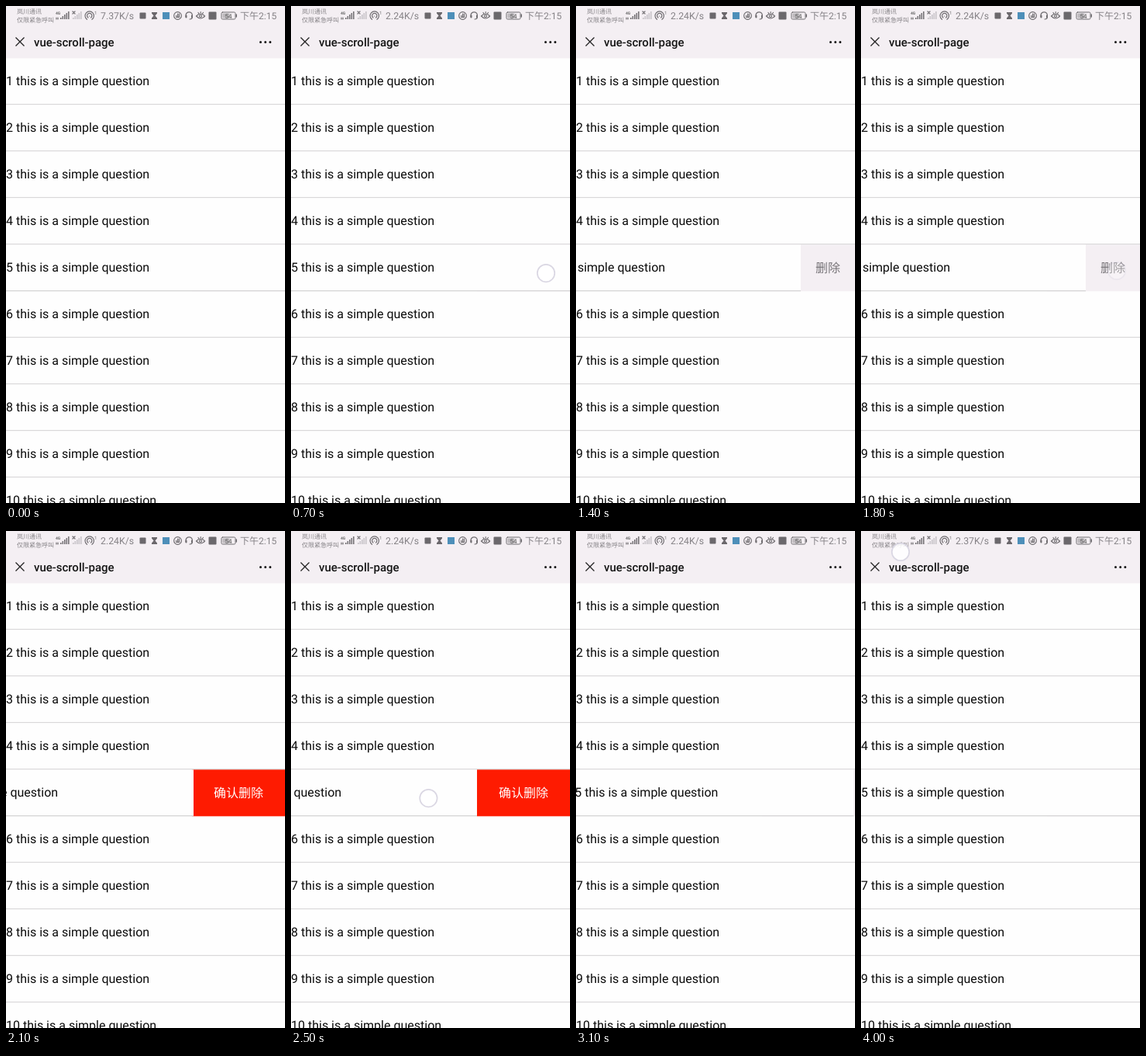
Recreate the animation shown at these times as an HTML page. Size 360 by 640 pixels, loop 4100 ms.

```html
<!DOCTYPE html>
<html lang="zh-CN">
<head>
<meta charset="utf-8">
<title>vue-scroll-page</title>
<style>
  html, body { margin: 0; width: 100%; height: 100%; overflow: hidden; background: #fefefe; }
  svg { display: block; width: 360px; height: 640px; }
  text {
    font-family: Roboto, "Noto Sans CJK SC", "Noto Sans CJK", sans-serif;
    white-space: pre; text-rendering: geometricPrecision;
  }
  .row { font-size: 16px; fill: #0c0c0c; }
  .action { font-size: 16px; text-anchor: middle; }
  .status { font-size: 12px; fill: #858286; }
  .tiny { font-size: 8px; fill: #858286; }
  .icon { fill: #6b686c; }
  .line { fill: none; stroke: #6f6c70; stroke-width: 1.2; stroke-linecap: round; }
</style>
</head>
<body>
<svg viewBox="0 0 360 640">
  <rect width="360" height="640" fill="#fefefe"/>
  <g transform="translate(0 .33)">
    <g id="list"></g>
    <rect id="panel" x="240" y="307" width="120" height="60"/>
    <text id="label" class="action" y="343"></text>
    <g id="swiped"></g>
  </g>

  <rect width="360" height="67.33" fill="#f4eff3"/>
  <text class="tiny" x="14" y="10">岚川通讯</text>
  <text class="tiny" x="14" y="21">仅限紧急呼叫</text>
  <g id="bars" fill="#777478"></g>
  <text x="64" y="11" font-size="5" font-weight="700" fill="#666">4G</text>
  <path class="line" d="M65 15v2m2-2v2M86 7l3 3m0-3l-3 3"/>
  <path class="line" d="M104.5 17.3a5.7 5.7 0 1 1 6.5 0M106 15a3.1 3.1 0 1 1 3.5 0M107.7 13v.1"/>
  <text x="114" y="11" font-size="6" fill="#777">1</text>
  <text id="speed" class="status" x="122" y="17" style="font-size: 12.3px"></text>
  <rect class="icon" x="172.5" y="8.5" width="8" height="8" rx="1"/>
  <path class="icon" d="M188 8h7v1.5l-2.5 3 2.5 3V17h-7v-1.5l2.5-3-2.5-3z"/>
  <rect x="202" y="8" width="9" height="9" fill="#4d8fb9"/>
  <g class="line">
    <circle cx="221.5" cy="12.5" r="4.8"/>
    <path d="M219.8 12v2.5h3.6V10m-1.8 0v4"/>
    <path d="M232 14v-2a4.2 4.2 0 0 1 8.4 0v2q0 3-3.4 3"/>
    <path d="M232.5 12.5v2m7.5-2v2" stroke-width="2"/>
    <path d="M245.5 13q5.5-6 11 0q-5.5 6-11 0zM248 8.5l.7 1m2.5-1.8v1m3.2-.2l-.7 1"/>
    <circle cx="251" cy="13" r="1.5"/>
    <rect x="278" y="8" width="18" height="9" rx="1.5" stroke-width="1"/>
  </g>
  <rect class="icon" x="261.5" y="7.5" width="10" height="10" rx="1"/>
  <rect x="279.5" y="9.5" width="9" height="6" fill="#bbb7bb"/>
  <rect class="icon" x="296.5" y="10.5" width="1.5" height="4"/>
  <text x="287" y="15.5" font-size="8" text-anchor="middle" fill="#555">54</text>
  <text class="status" x="302" y="17">下午2:15</text>

  <path d="M12.5 40.5l11 11m0-11l-11 11" stroke="#222" stroke-width="1.3"/>
  <text x="36" y="52" font-size="15" font-weight="500" fill="#161616">vue-scroll-page</text>
  <path d="M328.5 46.5h13" fill="none" stroke="#111" stroke-width="3"
    stroke-linecap="round" stroke-dasharray="0 6.2"/>
  <circle id="touch" r="11.2" fill="#fff" fill-opacity=".85" stroke="#dad7e3" stroke-width="1.7"/>
</svg>
<script>
const LOOP = 4100, STEP = 100;
const SLACK = 28;                 // finger travel before the row follows
const DELETE_W = 70, CONFIRM_W = 120;
const SETTLE = 300, FADE = 150;
const CONFIRM_AT = 1860, RELEASE_AT = 2850;

const openDrag = { start: 600, end: 1100, x: 332, y: 344, dx: -74, dy: 2.5 };
const tap = { start: 1700, end: 1700, x: 330, y: 341, dx: 0, dy: 0 };
const closeDrag = { start: 2400, end: 2800, x: 172, y: 344, dx: 86.5, dy: 1.5 };
const lastTap = { start: 4000, end: LOOP, x: 51, y: 27, dx: 0, dy: 0 };
const touches = [openDrag, tap, closeDrag, lastTap];

const el = id => document.getElementById(id);
const panel = el('panel'), label = el('label'), swiped = el('swiped');
const speed = el('speed'), touch = el('touch');

const clamp = p => Math.min(1, Math.max(0, p));
const easeOut = p => 1 - (1 - p) ** 2;
const settle = (t, start, from, to) => from + (to - from) * easeOut(clamp((t - start) / SETTLE));

// Share of a drag covered at time t; the finger speeds up evenly
const travel = (drag, t) => clamp((t - drag.start) / (drag.end - drag.start || 1)) ** 2;
const pulled = (drag, t) => Math.max(0, Math.abs(drag.dx) * travel(drag, t) - SLACK);

function rowOffset(t) {
  if (t <= openDrag.end) return -pulled(openDrag, t);
  if (t < CONFIRM_AT) return settle(t, openDrag.end, -pulled(openDrag, t), -DELETE_W);
  if (t < closeDrag.start) return settle(t, CONFIRM_AT, -DELETE_W, -CONFIRM_W);
  const dragged = pulled(closeDrag, t) - CONFIRM_W;
  return settle(t, RELEASE_AT, dragged, 0);
}

function rowMarkup(n) {
  const y = 7 + n * 60;
  return `<rect y="${y}" width="360" height="60" fill="#fefefe"/>
    <rect y="${y + 59}" width="360" height="1" fill="#c8c7c8"/>
    <text class="row" y="${y + 35}">${n} this is a simple question</text>`;
}

function signal(x, opacity) {
  let out = '';
  for (let i = 0; i < 5; i++) {
    const h = 2 + i * 2;
    out += `<rect x="${x + i * 2.5}" y="${17 - h}" width="1.6" height="${h}" opacity="${opacity}"/>`;
  }
  return out;
}

function drawTouch(t) {
  const hit = touches.find(k => t >= k.start && t < k.end + FADE);
  touch.setAttribute('opacity', hit ? 1 - clamp((t - hit.end) / FADE) : 0);
  if (!hit) return;
  const p = travel(hit, t);
  touch.setAttribute('cx', hit.x + hit.dx * p);
  touch.setAttribute('cy', hit.y + hit.dy * p);
}

function draw(t) {
  swiped.setAttribute('transform', `translate(${rowOffset(t)} 0)`);

  const confirm = t >= CONFIRM_AT && t < RELEASE_AT;
  panel.setAttribute('fill', confirm ? '#fe1b01' : '#f4eff3');
  label.setAttribute('fill', confirm ? '#fff' : '#777478');
  label.setAttribute('x', 360 - (confirm ? CONFIRM_W : DELETE_W) / 2);
  label.textContent = confirm ? '确认删除' : '删除';

  speed.textContent = (t < 600 ? '7.37' : t < 3600 ? '2.24' : '2.37') + 'K/s';
  drawTouch(t);
}

for (let n = 1; n <= 10; n++) {
  (n === 5 ? swiped : el('list')).innerHTML += rowMarkup(n);
}
el('bars').innerHTML = signal(70, 1) + signal(86, .35);

function tick() {
  draw(Math.floor(performance.now() % LOOP / STEP) * STEP);
  requestAnimationFrame(tick);
}
tick();
</script>
</body>
</html>
```
